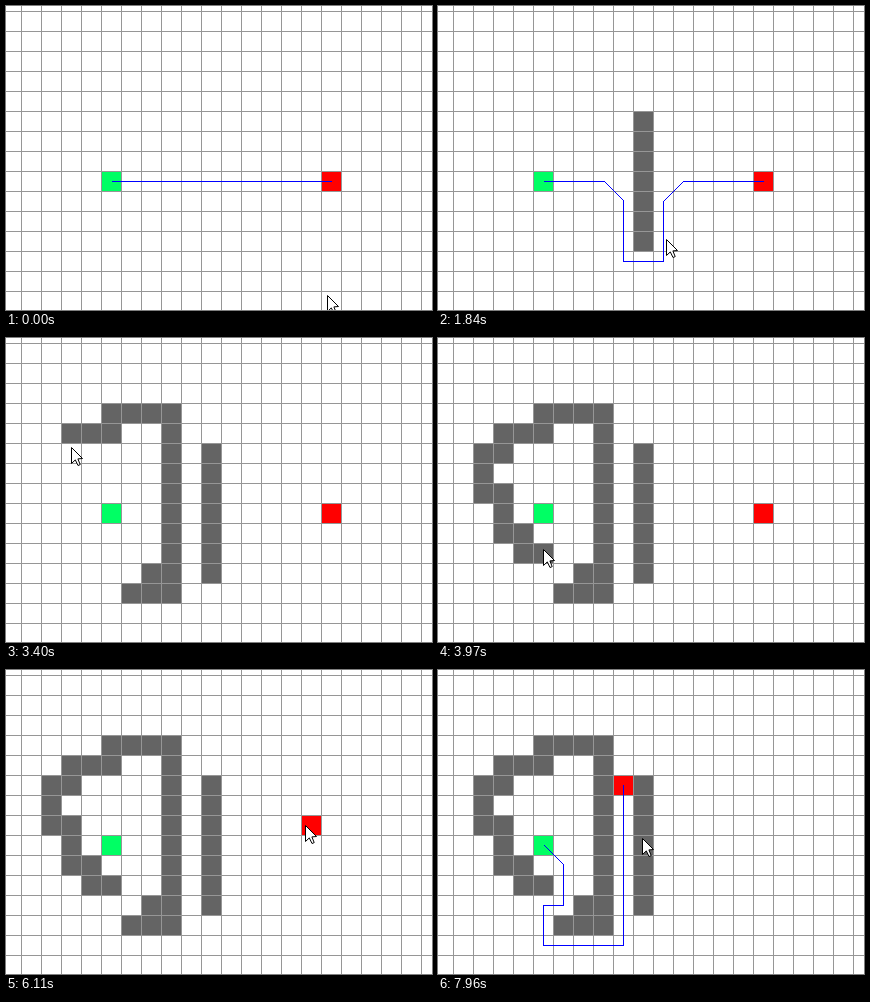
Recreate the animation shown at these times as an HTML page with a canvas. Size 426x304 px, loop 8000 ms.

```html
<!DOCTYPE html>
<html lang="en">
<head>
<meta charset="utf-8">
<title>Grid pathfinding</title>
<style>
  html, body { margin: 0; width: 100%; height: 100%; overflow: hidden; background: #fff; }
  canvas { display: block; }
</style>
</head>
<body>
<canvas id="stage" width="426" height="304"></canvas>
<script>
const LOOP = 8000, TICK = 93, CELL = 20, LEFT = 16, TOP = 6;
const ctx = document.getElementById('stage').getContext('2d');
const points = text => text.split(' ').map(p => p.split(',').map(Number));

// A wall is a walk from cell to cell.
const STEP = { U: [0, -1], D: [0, 1], L: [-1, 0], R: [1, 0] };
function walk(col, row, way) {
  const cells = [[col, row]];
  for (const c of way) cells.push([col += STEP[c][0], row += STEP[c][1]]);
  return cells;
}

// The pointer either travels through key points, drags the goal, or paints a wall.
const travel = (start, end, text) => ({ start, end, path: points(text) });
const drag = (...args) => ({ ...travel(...args), drags: true });
const paint = (start, end, power, wall) => ({ start, end, power, wall });
const moves = [
  travel(80, 360, '202,111'),
  paint(540, 800, 1, walk(9, 5, 'DDDDDD')),
  travel(1000, 1280, '272,221 291,213'),
  travel(1560, 2100, '181,248'),
  paint(2380, 3120, 1.5, walk(7, 12, 'LLRUR' + 'U'.repeat(7))),
  paint(3220, 3970, 0.7, walk(7, 3, 'LLLDLLDLDDRDDRDR')),
  travel(4430, 4900, '250,215 408,181'),
  travel(5470, 5730, '326,176'),
  drag(6010, 6670, '299,155 250,118 205,88 187,112'),
  travel(6950, 7130, '351,185 318,190'),
  travel(7680, 7960, '204,168')
];

// Routes with the span of time in which they show
const detour = '106,175 125,194 125,235 105,235 105,275 185,275 ';
const routes = [
  [0, 540, '106,175 325,175'],
  [1000, 2380, '106,175 166,175 185,194 185,255 225,255 225,195 245,175 325,175'],
  [4430, 6010, detour + '205,255 225,255 225,195 245,175 325,175'],
  [6950, LOOP, detour + '185,115']
].map(([from, to, text]) => [from, to, points(text)]);

// Share of a move that is done, held between screen updates
function progress({ start, end }, time) {
  const count = Math.round((end - start) / TICK) + 1;
  const gap = (end - start) / (count - 1);
  const done = Math.floor((time - start + TICK / 9) / gap) + 1;
  return Math.min(done, count) / count;
}

// Point at a fractional index of a list of points
function along(path, pos) {
  const i = Math.max(0, Math.min(Math.floor(pos), path.length - 2)), f = pos - i;
  return [0, 1].map(a => path[i][a] + (path[i + 1][a] - path[i][a]) * f);
}

function stateAt(time) {
  let pointer = [321, 289], goal = [15, 8];
  const cells = [];
  for (const move of moves) {
    if (time < move.start) break;
    const p = progress(move, time);
    if (move.wall) {
      const painted = p ** move.power * move.wall.length;
      const [col, row] = along(move.wall, Math.max(0, painted - 1));
      cells.push(...move.wall.slice(0, Math.max(1, Math.floor(painted))));
      pointer = [LEFT + col * CELL + 9, TOP + row * CELL + 5];
    } else {
      pointer = along([pointer, ...move.path], p * move.path.length);
    }
    if (move.drags)
      goal = [Math.floor((pointer[0] - LEFT) / CELL), Math.floor((pointer[1] - TOP) / CELL)];
  }
  return { pointer: pointer.map(Math.round), goal, cells };
}

function drawCell([col, row], color) {
  ctx.fillStyle = color;
  ctx.fillRect(LEFT + col * CELL, TOP + row * CELL, CELL, CELL);
}

function drawGrid() {
  ctx.fillStyle = '#969696';
  for (let x = LEFT - 1; x < 426; x += CELL) ctx.fillRect(x, 0, 1, 304);
  for (let y = TOP - 1; y < 304; y += CELL) ctx.fillRect(0, y, 426, 1);
}

// Unsmoothed one-pixel line
function drawLine([x0, y0], [x1, y1]) {
  const dx = x1 - x0, dy = y1 - y0, n = Math.max(Math.abs(dx), Math.abs(dy));
  ctx.fillStyle = '#00f';
  for (let i = 0; i <= n; i++)
    ctx.fillRect(Math.round(x0 + dx * i / n), Math.round(y0 + dy * i / n), 1, 1);
}

const arrow = new Path2D('M.5 .5V16.5L4.3 12.9L7 18.5L9.2 17.6L6.9 11.9L11.5 11.5Z');
function drawPointer([x, y]) {
  ctx.save();
  ctx.translate(x, y);
  ctx.lineJoin = 'round';
  ctx.fillStyle = '#fff';
  ctx.strokeStyle = '#000';
  ctx.fill(arrow);
  ctx.stroke(arrow);
  ctx.restore();
}

function draw(time) {
  const { pointer, goal, cells } = stateAt(time);
  ctx.fillStyle = '#fff';
  ctx.fillRect(0, 0, 426, 304);
  cells.forEach(c => drawCell(c, '#646464'));
  drawCell([4, 8], '#00ff64');
  drawCell(goal, '#f00');
  drawGrid();
  const route = routes.find(([from, to]) => time >= from && time < to);
  if (route) route[2].slice(1).forEach((p, i) => drawLine(route[2][i], p));
  drawPointer(pointer);
}

const begin = performance.now();
function tick() {
  draw((performance.now() - begin) % LOOP);
  requestAnimationFrame(tick);
}
tick();
</script>
</body>
</html>
```
